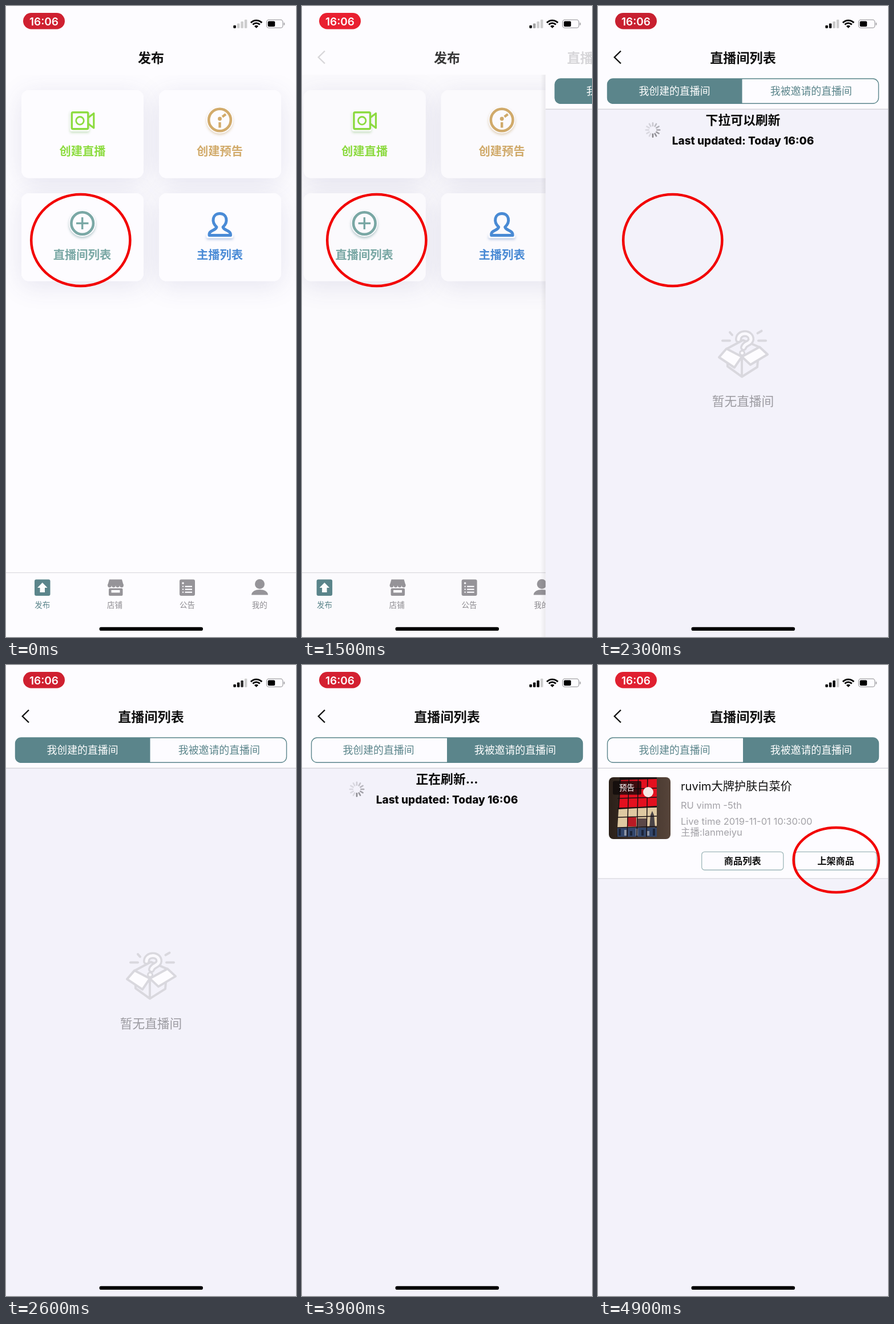
Recreate the animation shown at these times as an HTML page with a canvas. Size 508 px wide and 1102 px high, loop 5 s.

```html
<!DOCTYPE html>
<html lang="zh-CN">
<head>
<meta charset="utf-8">
<style>
html, body { margin: 0; width: 508px; height: 1102px; overflow: hidden; background: #fdfcff; }
canvas { display: block; }
</style>
</head>
<body>
<canvas id="stage" width="508" height="1102"></canvas>
<script>
const c = document.getElementById('stage').getContext('2d');
const W = 508, H = 1102, LOOP = 5000, STEP = 100, PULL = 73;
const PAPER = '#fdfcff', LAVENDER = '#f3f2fa', TEAL = '#5b858b', GRAY = '#969499', INK = '#111';
const FONT = 'Inter, "Noto Sans CJK SC", "Noto Sans CJK", sans-serif';

const clamp = v => Math.min(1, Math.max(0, v));
const smooth = v => { v = clamp(v); return v * v * (3 - 2 * v); };
const ramp = (t, start, length) => smooth((t - start) / length);
const push = t => {
  const x = Math.max(0, t - 1461) * 0.01826;
  return t >= 2000 ? 1 : 1 - (1 + x) * Math.exp(-x);
};

function group(draw, dx = 0, dy = 0, alpha = 1) {
  c.save();
  c.translate(dx, dy);
  c.globalAlpha *= alpha;
  draw();
  c.restore();
}

function text(s, x, y, size, color, weight = 400, align = 'center') {
  c.font = `${weight} ${size}px ${FONT}`;
  c.textAlign = align;
  c.fillStyle = color;
  c.fillText(s, x, y + size * 0.37);
}

function rect(x, y, w, h, color, r = 0) {
  c.beginPath();
  c.roundRect(x, y, w, h, r);
  c.fillStyle = color;
  c.fill();
}

function frame(x, y, w, h, color, width, r) {
  c.beginPath();
  c.roundRect(x, y, w, h, r);
  stroke(color, width);
}

function stroke(color, width) {
  c.strokeStyle = color;
  c.lineWidth = width;
  c.stroke();
}

function line(points, color, width, fill) {
  c.beginPath();
  for (let i = 0; i < points.length; i += 2) c.lineTo(points[i], points[i + 1]);
  if (fill) { c.closePath(); c.fillStyle = fill; c.fill(); }
  if (width) stroke(color, width);
}

function ring(x, y, rx, ry, color, width) {
  c.beginPath();
  c.ellipse(x, y, rx, ry, 0, 0, 7);
  stroke(color, width);
}

function dot(x, y, r, color) {
  c.beginPath();
  c.arc(x, y, r, 0, 7);
  c.fillStyle = color;
  c.fill();
}

function statusBar(t) {
  const glow = 0.5 - 0.5 * Math.cos((t - 2300) / 2000 * 2 * Math.PI);
  rect(30, 12, 73, 28.5, `rgb(${200 + 36 * glow},32,48)`, 14.2);
  text('16:06', 66.5, 26.5, 19, '#fff', 600);

  const on = [1, ramp(t, 1350, 500), ramp(t, 2250, 500), 0];
  on.forEach((v, i) => {
    const h = 5 + 3.3 * i, shade = 205 * (1 - v);
    rect(398.3 + 6.5 * i, 38.7 - h, 4.5, h, `rgb(${shade},${shade},${shade})`, 1.2);
  });

  for (const r of [13.2, 8.4]) {
    c.beginPath();
    c.arc(438.5, 38.3, r, -Math.PI * 0.76, -Math.PI * 0.24);
    stroke('#000', 2.9);
  }
  c.beginPath();
  c.moveTo(438.5, 38.8);
  c.arc(438.5, 38.8, 5, -Math.PI * 0.75, -Math.PI * 0.25);
  c.fillStyle = '#000';
  c.fill();

  frame(456.5, 24.2, 28.5, 14, '#a3a2a6', 1.3, 4);
  rect(458.7, 26.4, 12.5, 9.6, '#000', 2);
  rect(486.5, 29, 1.8, 4.6, '#a3a2a6', 1);
}

function shade(color, blur, dy) {
  c.shadowColor = color;
  c.shadowBlur = blur;
  c.shadowOffsetY = dy;
}

function cards() {
  const spots = [[27, 147], [268, 147], [27, 327], [268, 327]];
  group(() => {
    shade('rgba(70,70,130,.13)', 46, 8);
    for (const [x, y] of spots) rect(x, y, 214, 153.5, PAPER, 13);
  });
  for (const [x, y] of spots) rect(x, y, 214, 153.5, PAPER, 13);
}

// A pale plate under an icon lets its soft shadow show only around the outer edge.
function plate(draw, color) {
  group(() => {
    shade(color, 4, 2.5);
    draw();
    c.fillStyle = PAPER;
    c.fill();
  });
}

function cardIcons() {
  const green = '#8ddc40', tan = '#d2ab6b', sage = '#7aa8a5', blue = '#4a8bd6';
  const disc = (x, y, color, shadow) => {
    plate(() => { c.beginPath(); c.arc(x, y, 23.5, 0, 7); }, shadow);
    ring(x, y, 19.3, 19.3, color, 4.6);
  };
  c.lineJoin = 'round';

  plate(() => { c.beginPath(); c.roundRect(112, 183, 34, 36, 3); }, 'rgba(90,170,60,.3)');
  frame(115.3, 185.8, 28.5, 29, green, 3.4, 2);
  ring(129.5, 200.3, 6.8, 6.8, green, 2.8);
  line([144, 195, 153.8, 187.5, 153.8, 213, 144, 205.5], green, 3.2);

  disc(374.5, 199, tan, 'rgba(180,140,70,.35)');
  dot(374.5, 197, 3.4, tan);
  line([374.5, 203, 374.5, 212.5], tan, 4.4);
  line([379, 193.5, 385, 189], tan, 4.2);

  disc(133.7, 379.5, sage, 'rgba(80,130,130,.4)');
  line([123, 379.5, 144.5, 379.5], sage, 3.4);
  line([133.7, 369, 133.7, 390], sage, 3.4);

  plate(() => { c.beginPath(); c.roundRect(351, 398, 47, 7.5, 3); }, 'rgba(60,110,180,.35)');
  c.beginPath();
  c.moveTo(356, 400.5);
  c.bezierCurveTo(355, 391, 367, 393, 369, 386);
  c.bezierCurveTo(359, 377, 362, 362.5, 374.5, 362.5);
  c.bezierCurveTo(387, 362.5, 390, 377, 380, 386);
  c.bezierCurveTo(382, 393, 394, 391, 393.5, 400.5);
  c.closePath();
  stroke(blue, 5);

  text('创建直播', 134, 253.5, 20.3, green, 700);
  text('创建预告', 374.5, 253.5, 20.3, tan, 700);
  text('直播间列表', 133.5, 434, 20.3, sage, 700);
  text('主播列表', 374.5, 434, 20.3, blue, 700);
}

function tabBar() {
  rect(0, 989, W, 1.2, '#dddce1');
  rect(50, 1001.5, 27.5, 28.5, TEAL, 3);
  line([63.8, 1007, 72.5, 1016, 68, 1016, 68, 1024, 59.5, 1024, 59.5, 1016, 55, 1016], '', 0, '#fff');

  line([181, 1001.5, 203, 1001.5, 206, 1012, 178, 1012], '', 0, GRAY);
  for (let i = 0; i < 4; i++) dot(181.5 + 7 * i, 1012, 3.4, GRAY);
  rect(180, 1017, 24.5, 13, GRAY, 2);
  rect(184.5, 1020, 15, 4.5, PAPER);

  rect(304, 1001.5, 27, 28.5, GRAY, 3);
  dot(310, 1008, 1.8, PAPER);
  for (const y of [1013, 1018, 1023]) {
    dot(310, y + 0.8, 1.2, PAPER);
    rect(313.5, y - 0.3, 12.5, 2.2, PAPER);
  }

  dot(444.5, 1009.5, 8.5, GRAY);
  c.beginPath();
  c.moveTo(430, 1028.5);
  c.bezierCurveTo(430, 1016, 459, 1016, 459, 1028.5);
  c.closePath();
  c.fill();

  ['发布', '店铺', '公告', '我的'].forEach((s, i) =>
    text(s, 63.8 + 126.8 * i, 1046, 13.5, i ? '#8d8b90' : TEAL));
}

function homePage() {
  rect(0, 120, W, H - 120, PAPER);
  cards();
  cardIcons();
  tabBar();
}

function segments(v) {
  const half = (x, w, radii, a) => group(() => rect(x, 127, w, 44, TEAL, radii), 0, 0, a);
  half(16, 236.5, [10, 0, 0, 10], 1 - v);
  half(254, 238, [0, 10, 10, 0], v);
  frame(16.5, 127, 475, 43.3, TEAL, 1.4, 10);
  const label = (s, x, a) => {
    text(s, x, 148.5, 17.9, TEAL);
    group(() => text(s, x, 148.5, 17.9, '#fff'), 0, 0, a);
  };
  label('我创建的直播间', 134, 1 - v);
  label('我被邀请的直播间', 373.3, v);
}

function spinner(turn, alpha) {
  for (let i = 0; i < 12; i++) {
    const age = (((turn - i / 12) % 1) + 1) % 1;
    group(() => {
      c.rotate(i / 6 * Math.PI);
      rect(-1.3, -13.5, 2.6, 7.5, '#66656a', 1.3);
    }, 96, 217, alpha * (0.18 + 0.6 * Math.max(0, 1 - age * 1.6)));
  }
}

function refreshHeader(t, h, idle, fade, phase) {
  group(() => {
    spinner((t - phase) / 1000, fade);
    text(idle ? '下拉可以刷新' : '正在刷新...', 254, 199, 21.8, '#0a0a0a', 700);
    text('Last updated: Today 16:06', 254, 235.3, 19, '#0a0a0a', 800);
  }, 0, h - PULL);
}

function emptyBox() {
  const g = '#d9d8de';
  c.lineJoin = c.lineCap = 'round';
  line([218, 585, 231, 585], g, 4);
  line([281, 585, 294, 585], g, 4);
  line([231, 570.5, 235, 575], g, 4);
  line([279.5, 572, 286.5, 568], g, 4);
  line([226, 599, 254, 584, 282, 596, 279, 631, 252, 648, 227, 630], g, 4, LAVENDER);
  line([252, 613, 252, 647], g, 4);
  const mark = () => {
    c.beginPath();
    c.moveTo(246, 583);
    c.bezierCurveTo(246, 569, 269, 570, 268, 583);
    c.bezierCurveTo(267, 591, 257, 589, 255, 597);
  };
  mark();
  stroke(g, 12);
  dot(252.5, 606.5, 5.5, g);
  mark();
  stroke('#faf9fd', 5);
  dot(252.5, 606.5, 2.5, '#faf9fd');
  line([212, 614, 225, 599, 252, 613, 239, 632], g, 4, PAPER);
  line([297, 609, 283, 596, 252, 613, 267, 627], g, 4, PAPER);
  text('暂无直播间', 254, 691, 21.7, '#9c9ba1');
}

function photo() {
  c.save();
  c.beginPath();
  c.roundRect(19, 196, 108, 108, 8);
  c.clip();
  const wall = c.createLinearGradient(19, 0, 127, 0);
  wall.addColorStop(0, '#2b2019');
  wall.addColorStop(1, '#56443a');
  rect(19, 196, 108, 108, wall);
  line([38, 196, 103, 196, 103, 300, 33, 300], '', 0, '#191313');
  line([40, 201, 103, 199, 103, 246, 37, 250], '', 0, '#e3101f');
  line([36, 252, 103, 248, 103, 283, 34, 284], '', 0, '#dfc9a2');
  rect(51, 266, 16, 16, '#b81a24');
  rect(69, 268, 16, 14, '#5c4848');
  line([90, 284, 92, 262, 95, 255, 98, 262, 100, 284], '', 0, '#4a4448');
  rect(34, 284, 69, 16, '#33466b');
  for (let i = 0; i < 7; i++) rect(36 + i * 10, 286 + i % 3 * 2, 4, 12 - i % 3 * 2, i % 2 ? '#8c93a3' : '#1c2438');
  for (let i = 1; i < 4; i++) line([38 + 16.3 * i, 196, 34 + 17 * i, 300], '#1a1012', 1.5);
  for (const y of [216, 232, 249, 265, 283]) line([34, y + 1, 103, y - 1], '#1a1012', 1.5);
  dot(88, 222, 9, '#f6e9e6');
  rect(26, 202.5, 50, 24, 'rgba(15,10,10,.78)', 3);
  c.restore();
  text('预告', 50.5, 214.5, 13.5, '#fff');
}

function roomCard() {
  const soft = '#a3a2a7';
  rect(0, 100, W, 273, PAPER);
  rect(0, 372.3, W, 1.2, '#dad9df');
  photo();
  text('ruvim大牌护肤白菜价', 145, 211.5, 20.2, INK, 400, 'left');
  text('RU vimm -5th', 145, 245, 16.5, soft, 400, 'left');
  text('Live time 2019-11-01 10:30:00', 145, 273, 16.5, soft, 400, 'left');
  text('主播:lanmeiyu', 145, 292, 16.5, soft, 400, 'left');
  [['商品列表', 181.7], ['上架商品', 345]].forEach(([s, x]) => {
    frame(x, 326.3, 143, 31.7, '#9fb8ba', 1.3, 5);
    text(s, x + 71.5, 342, 16.2, INK, 700);
  });
}

function listPage(t) {
  const second = t >= 3100;
  const [open, done, phase] = second ? [3150, 3940, 3350] : [1500, 2280, 1800];
  const back = ramp(t, done, 400);
  const h = PULL * ramp(t, open, 250) * (1 - back);

  rect(0, 120, W, H - 120, LAVENDER);
  c.save();
  c.beginPath();
  c.rect(0, 181, W, H - 181);
  c.clip();
  if (h > 0.1) refreshHeader(t, h, t >= done, 1 - back, phase);
  if (!second && t >= done) group(emptyBox, 0, h - PULL);
  if (second && t >= done) group(roomCard, 0, h);
  c.restore();

  rect(0, 120, W, 60, PAPER);
  rect(0, 179.6, W, 1.3, '#d6d5db');
  segments(t < 3000 ? 0 : second ? 1 : 0.5);
}

function draw(t) {
  const p = push(t), x = W * (1 - p);
  rect(0, 0, W, H, PAPER);
  if (p < 1) {
    group(homePage, -0.3 * W * p);
    if (p > 0) {
      rect(0, 120, W, H - 120, `rgba(0,0,20,${0.05 * p})`);
      const edge = c.createLinearGradient(x - 9, 0, x, 0);
      edge.addColorStop(0, 'rgba(0,0,0,0)');
      edge.addColorStop(1, 'rgba(0,0,0,.07)');
      rect(x - 9, 120, 9, H - 120, edge);
    }
    rect(0, 0, W, 120, PAPER);
  }
  if (p > 0) group(() => listPage(t), x);

  group(() => text('发布', 254, 90, 23, INK, 700), 0, 0, 1 - p);
  group(() => text('直播间列表', 254, 90, 23.1, INK, 700), 319 * (1 - p), 0, p);
  group(() => line([40, 78.5, 28.8, 89.5, 40, 100.5], INK, 2.4), 0, 0, p);

  statusBar(t);
  rect(163.5, 1084.8, 181.5, 6.2, '#000', 3.1);
  if (t < 2500) ring(130.8, 409, 86.6, 80, '#f20000', 4.5);
  if (t >= 4300) ring(417.2, 340.5, 74.6, 56.5, '#f20000', 4.5);
}

function tick(now) {
  draw(Math.floor(now % LOOP / STEP) * STEP);
  requestAnimationFrame(tick);
}
requestAnimationFrame(tick);
</script>
</body>
</html>
```
